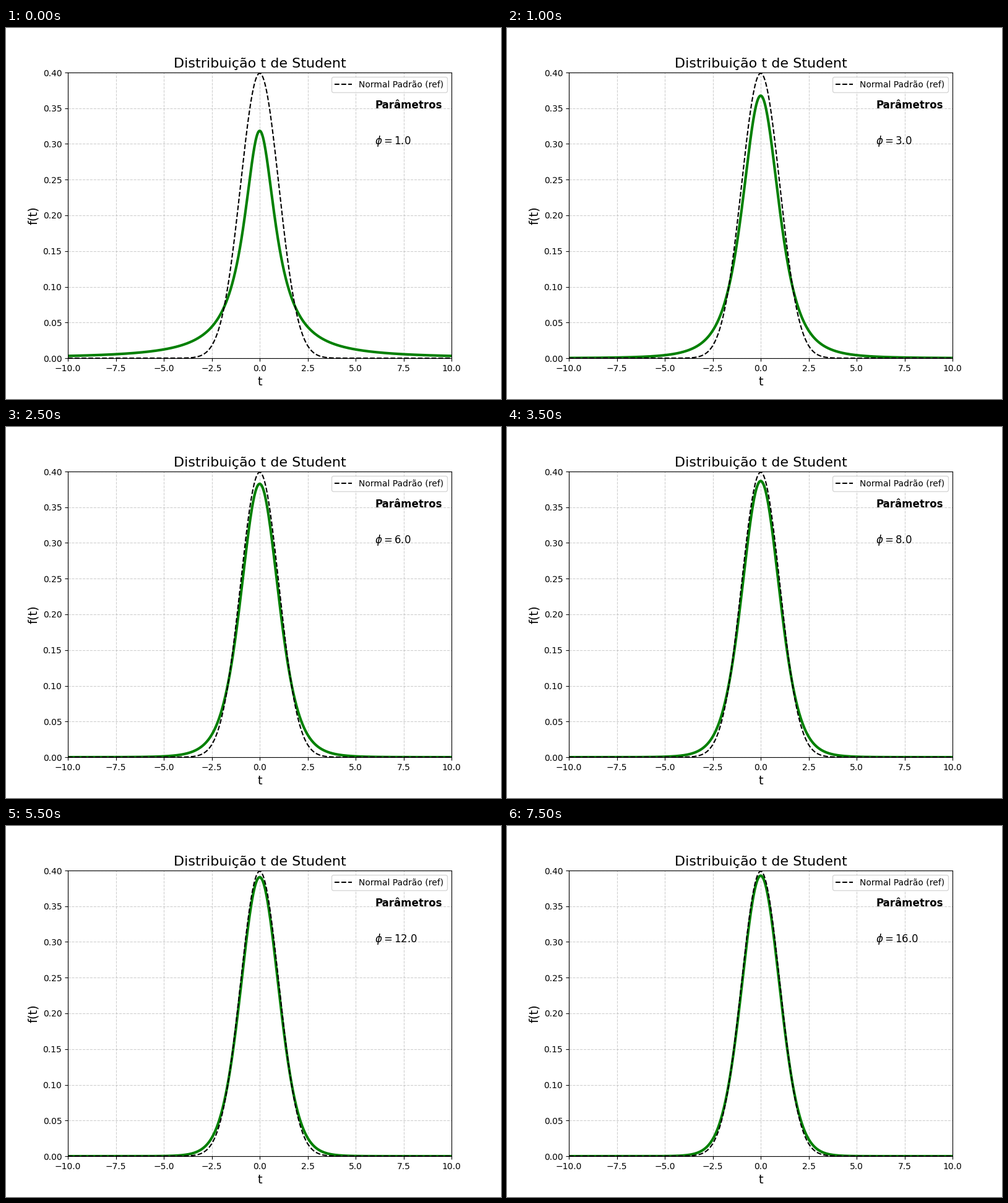
Animation, 800 px wide and 600 px high, one loop 8000 ms. Source, as a matplotlib script:

```python
import math

import numpy as np
import matplotlib.pyplot as plt
from matplotlib.animation import FuncAnimation

FRAMES = 16
INTERVAL = 500

plt.rcParams["font.family"] = "DejaVu Sans"


def normal_pdf(t):
    return np.exp(-t**2 / 2) / math.sqrt(2 * math.pi)


def student_pdf(t, phi):
    log_c = math.lgamma((phi + 1) / 2) - math.lgamma(phi / 2)
    c = math.exp(log_c) / math.sqrt(phi * math.pi)
    return c * (1 + t**2 / phi) ** (-(phi + 1) / 2)


t = np.linspace(-10, 10, 1000)

fig, ax = plt.subplots(figsize=(8, 6), dpi=100)
ax.set_xlim(-10, 10)
ax.set_ylim(0, 0.4)
ax.set_title("Distribuição t de Student", fontsize=16)
ax.set_xlabel("t", fontsize=14)
ax.set_ylabel("f(t)", fontsize=14)
ax.grid(True, linestyle="--", alpha=0.6)

curve, = ax.plot([], [], color="green", lw=3)
ax.plot(t, normal_pdf(t), "k--", lw=1.5, label="Normal Padrão (ref)")
ax.legend(loc="upper right")

ax.text(6, 0.35, "Parâmetros", fontsize=12, fontweight="bold")
phi_text = ax.text(6, 0.30, "", fontsize=12)


def update(i):
    phi = 1.0 + i
    curve.set_data(t, student_pdf(t, phi))
    phi_text.set_text(rf"$\phi = {phi:.1f}$")
    return curve, phi_text


anim = FuncAnimation(fig, update, frames=FRAMES, interval=INTERVAL,
                     init_func=lambda: update(0), repeat=True, repeat_delay=0)

plt.show()
```
